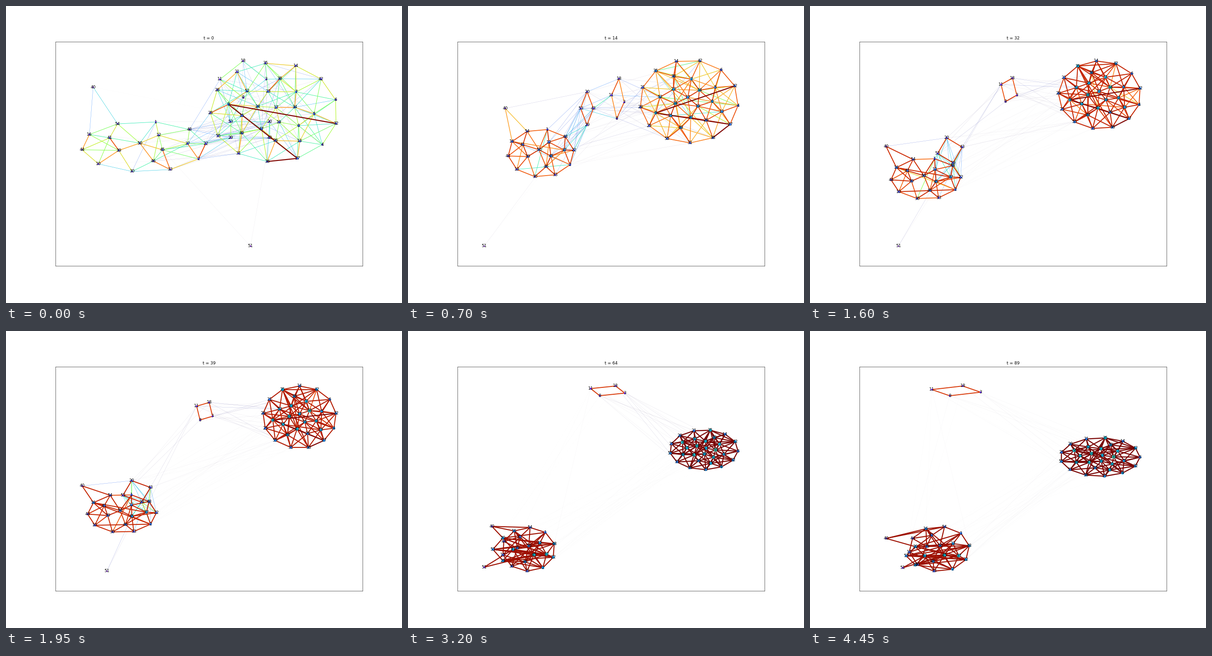
A matplotlib script that plays this animation: 864x648 px, repeating every 4.5 s.

```python
import numpy as np
import matplotlib.pyplot as plt
from itertools import combinations
from matplotlib.animation import FuncAnimation
from matplotlib.collections import LineCollection

FRAMES, INTERVAL = 90, 50
GOLDEN = np.pi * (3 - np.sqrt(5))
plt.rcParams["font.family"] = "DejaVu Sans"

# Each community: rim nodes clockwise, core nodes from the hub outwards, and a
# track of (center x, center y, half width, half height, tilt) at KEY_TIMES.
KEY_TIMES = [0, 14, 39, 52, 89]
COMMUNITIES = {
    "right": (
        [14, 42, 6, 32, 4, 27, 36, 31, 55, 25, 28, 21, 35],
        [17, 19, 24, 34, 47, 23, 0, 15, 7, 26, 52, 5, 49, 38, 13, 9],
        [(582, 232, 138, 108, 20), (612, 210, 107, 90, -15), (640, 188, 80, 68, 0),
         (653, 253, 66, 44, 40), (633, 275, 87, 42, 35)]),
    "left": (
        [54, 1, 48, 22, 2, 33, 30, 10, 44, 16],
        [50, 45, 39, 12, 46, 41, 37],
        [(300, 307, 135, 55, -25), (290, 322, 72, 52, -25), (253, 398, 75, 42, -20),
         (268, 478, 52, 47, 0), (282, 475, 66, 49, 10)]),
    "bridge": (
        [20, 43, 29, 53], [],
        [(530, 270, 60, 25, 45), (390, 225, 14, 36, 0), (285, 350, 32, 25, -20),
         (212, 471, 22, 27, 0), (230, 490, 20, 20, 0)]),
    "small": (
        [18, 3, 8, 11], [],
        [(515, 160, 50, 40, 0), (457, 204, 14, 44, 10), (433, 175, 20, 22, 30),
         (500, 132, 33, 12, 30), (319, 131, 55, 11, 15)]),
    "tail": (
        [40], [],
        [(190, 177, 0, 0, 0), (212, 225, 0, 0, 0), (166, 338, 0, 0, 0),
         (208, 415, 0, 0, 0), (166, 452, 0, 0, 0)]),
    "outlier": (
        [51], [],
        [(531, 524, 0, 0, 0), (166, 524, 0, 0, 0), (220, 524, 0, 0, 0),
         (166, 516, 0, 0, 0), (202, 516, 0, 0, 0)]),
}
NODES = 56
group_of = np.empty(NODES, object)
for name, (rim, core, _) in COMMUNITIES.items():
    group_of[rim + core] = name


def layout(t):
    """Place rims on ellipses and cores on a spiral, then fit the stage box."""
    pos = np.zeros((NODES, 2))
    for rim, core, track in COMMUNITIES.values():
        x, y, rx, ry, tilt = (np.interp(t, KEY_TIMES, c) for c in zip(*track))
        k = np.arange(len(core))
        angle = np.r_[2 * np.pi * np.arange(len(rim)) / len(rim), GOLDEN * k]
        radius = np.r_[np.ones(len(rim)), 0.75 * np.sqrt((k + 0.3) / max(len(core), 1))]
        angle += np.radians(tilt)
        pos[rim + core] = np.c_[x + rx * radius * np.sin(angle),
                                y - ry * radius * np.cos(angle)]
    low, high = pos.min(axis=0), pos.max(axis=0)
    return (166, 120) + (pos - low) / (high - low) * (554, 404)


def distances(pos):
    return np.linalg.norm(pos[:, None] - pos[None], axis=2)


CHAIN = {(27, 36), (9, 27), (9, 32)}


def build_edges(rng):
    """Nearest neighbours inside communities plus seeded loose ties."""
    edges = CHAIN | {(40, 54), (16, 40), (20, 40), (45, 51), (43, 51)}
    spread = sum(distances(layout(t)) for t in KEY_TIMES)
    reach = distances(layout(0))
    for a, b in combinations(range(NODES), 2):
        same = group_of[a] == group_of[b]
        limit = np.inf if same else 230
        if reach[a, b] < limit and rng.random() < (0.08 if same else 0.12):
            edges.add((a, b))
    for source, target, k in (("right", "right", 6), ("left", "left", 4),
                              ("small", "small", 2), ("bridge", "bridge", 2),
                              ("bridge", "left", 5)):
        members = np.flatnonzero(group_of == target)
        for n in np.flatnonzero(group_of == source):
            others = members[members != n]
            near = others[np.argsort(spread[n, others])[:k]]
            edges |= {(min(n, m), max(n, m)) for m in near}
    return np.array(sorted(edges))


rng = np.random.default_rng(4)
edges = build_edges(rng)
heads, tails = edges.T
ends = [{group_of[a], group_of[b]} for a, b in edges]
is_chain = np.array([tuple(e) in CHAIN for e in edges.tolist()])
inner = np.array([len(pair) == 1 or pair == {"tail", "left"} for pair in ends])
joining = np.array([pair <= {"left", "bridge", "tail", "outlier"} for pair in ends])
binds = inner | joining
final = np.array([1 if "right" in p else 0.86 if "small" in p else 0.955 for p in ends])
looseness = rng.uniform(0.45, 1, len(edges))

# Time at which each tie starts to tighten
onset = np.where(inner, rng.uniform(4, 34, len(edges)), 39)
onset[["outlier" in pair for pair in ends]] = 46


def edge_weights(pos, t):
    length = np.linalg.norm(pos[heads] - pos[tails], axis=1)
    near = np.where(inner, 0.92 * np.exp(-(length / 110) ** 2), 0.9 * np.exp(-length / 75))
    near *= looseness + (1 - looseness) * inner * min(t / 12, 1)
    f = np.clip((t - onset) / 14, 0, 1)
    cohesion = binds * f * f * (3 - 2 * f)
    ripe = np.clip((t - 14) / 46, 0, 1)
    limit = 0.83 + (final - 0.83) * ripe
    weight = near * (1 - cohesion) + limit * cohesion
    return np.where(is_chain, 0.99, weight)


fig, ax = plt.subplots(figsize=(16, 12), dpi=54)
fig.subplots_adjust(left=0.125, right=0.9, bottom=0.125, top=0.88)
ax.set(xlim=(108, 777.6), ylim=(567, 77.76), xticks=[], yticks=[])
title = ax.set_title("t = 0", fontsize=12)
lines = ax.add_collection(LineCollection([], zorder=1))
dots = ax.scatter(*layout(0).T, linewidths=0, zorder=2)
labels = [ax.text(x, y, str(n), fontsize=12, ha="center", va="center", zorder=3)
          for n, (x, y) in enumerate(layout(0))]


def update(t):
    pos = layout(t)
    weight = edge_weights(pos, t)
    order = np.argsort(weight)
    lines.set_segments(pos[edges[order]])
    lines.set_color(plt.cm.turbo(weight[order]))
    lines.set_linewidth(3 * weight[order])
    strength = np.bincount(heads, weight, NODES) + np.bincount(tails, weight, NODES)
    dots.set_offsets(pos)
    dots.set_sizes(12 + 7 * strength)
    dots.set_facecolor(plt.cm.rainbow(strength / 36))
    for label, point in zip(labels, pos):
        label.set_position(point)
    title.set_text(f"t = {t}")
    return [lines, dots, title, *labels]


anim = FuncAnimation(fig, update, frames=FRAMES, interval=INTERVAL, repeat=True, repeat_delay=0)
plt.show()
```
